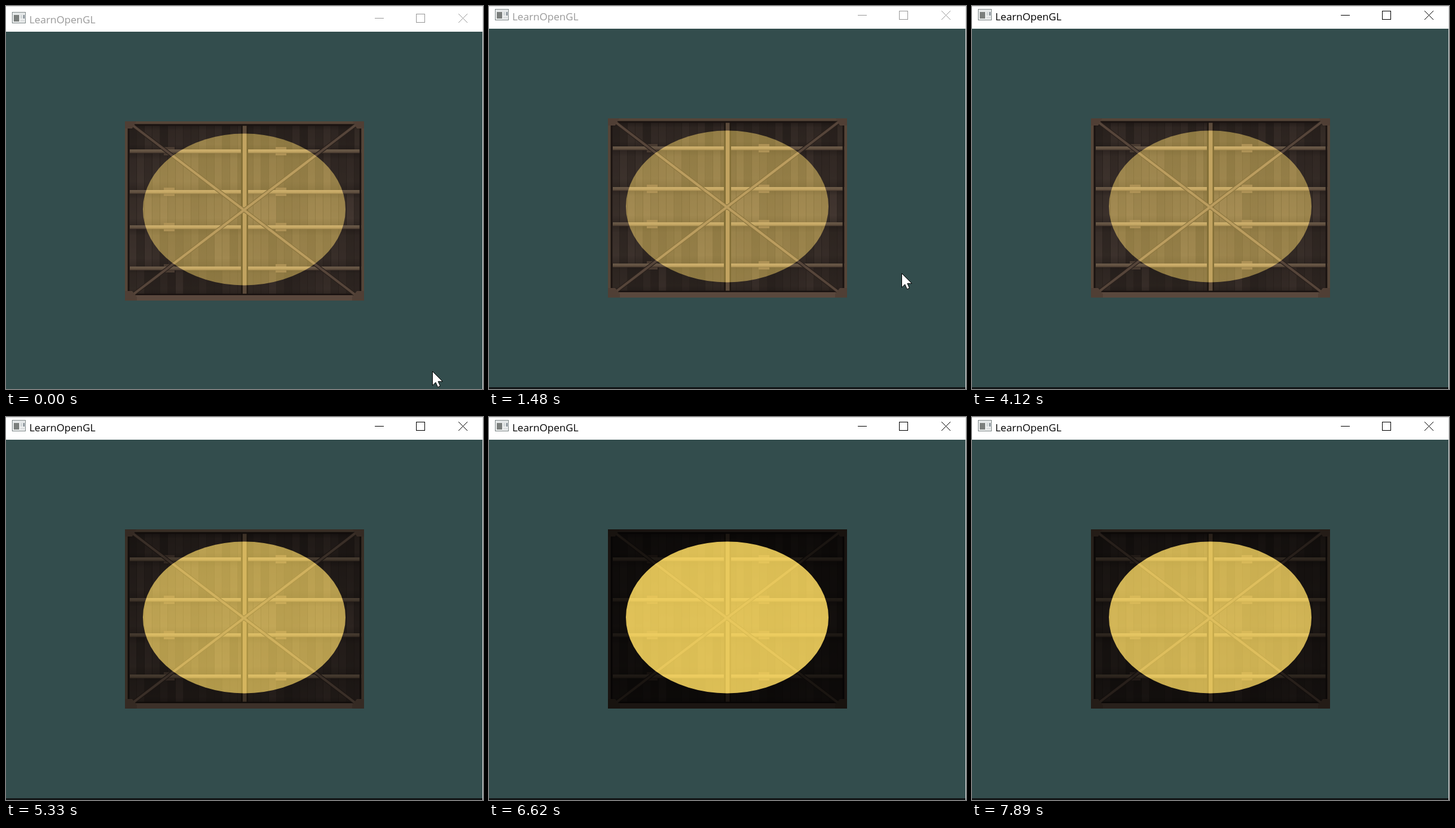
An HTML page that plays this animation: 798 by 641 pixels, repeating every 8000 ms.

```html
<!DOCTYPE html>
<html lang="en">
<head>
<meta charset="utf-8">
<title>LearnOpenGL</title>
<style>
html, body { margin: 0; width: 100%; height: 100%; overflow: hidden; background: #334d4d; }
svg { display: block; width: 798px; height: 641px; }
text { font: 17.1px "Open Sans", "Noto Sans", sans-serif; }
</style>
</head>
<body>
<svg viewBox="0 0 798 641">
  <defs>
    <linearGradient id="shade" x2="0" y2="1">
      <stop offset="0" stop-color="#17100f" stop-opacity=".45"/>
      <stop offset=".25" stop-color="#17100f" stop-opacity=".08"/>
      <stop offset=".8" stop-color="#17100f" stop-opacity="0"/>
      <stop offset="1" stop-color="#17100f" stop-opacity=".2"/>
    </linearGradient>
    <linearGradient id="beam" x2="0" y2="1">
      <stop offset="0" stop-color="#b3977c"/>
      <stop offset=".65" stop-color="#a08469"/>
      <stop offset="1" stop-color="#655044"/>
    </linearGradient>
    <clipPath id="quad"><rect width="400" height="300"/></clipPath>
  </defs>
  <rect width="798" height="641" fill="#334d4d"/>
  <g id="win">
    <rect width="798" height="43" fill="#fff"/>
    <rect id="hover" width="69" height="43" fill="#e5e5e5"/>
    <g shape-rendering="crispEdges">
      <rect x="10.5" y="10.5" width="22" height="18" fill="#eef0f0" stroke="#7e8788"/>
      <rect x="12" y="12" width="19" height="2" fill="#dfe3e4"/>
      <rect x="13" y="15" width="9" height="11" fill="#7b7f7d"/>
      <rect x="24" y="15" width="4" height="6" fill="#d5dadb"/>
      <rect x="29" y="15" width="2" height="6" fill="#75808a"/>
      <rect x="24" y="23" width="7" height="3" fill="#dcdfe0"/>
    </g>
    <text id="title" x="39" y="29">LearnOpenGL</text>
    <g id="buttons" fill="none">
      <path d="M617 20.5h15M686.5 13.5h14v14h-14z" shape-rendering="crispEdges"/>
      <path d="M757 13l15 15M772 13l-15 15"/>
    </g>
    <g transform="translate(199 193)" clip-path="url(#quad)">
      <g id="wood"></g>
      <g id="mix">
        <rect width="400" height="300" fill="#000"/>
        <ellipse cx="199.5" cy="147.5" rx="169.5" ry="127" fill="#fbda5c"/>
      </g>
    </g>
    <rect y="643" width="798" height="9" fill="#121617"/>
  </g>
  <rect width="798" height="1" fill="#d2d2d2"/>
  <rect x="797" width="1" height="641" fill="#dcdfdf"/>
  <path id="cursor" d="M.5 .5v23.5l5.3-5.1 3.6 8 4-1.8-3.5-7.8h7.4z" fill="#fff" stroke="#000"/>
</svg>
<script>
const LOOP = 8000;
const STEP = 67;
const $ = id => document.getElementById(id);

function add(tag, attrs) {
  const el = document.createElementNS("http://www.w3.org/2000/svg", tag);
  for (const key in attrs) el.setAttribute(key, attrs[key]);
  $("wood").appendChild(el);
}
const box = (x, y, width, height, fill) => add("rect", { x, y, width, height, fill });

function buildPlanks(top, height, tone, rand) {
  for (let x = 7; x < 395; x += 13) {
    const v = tone + (rand() - 0.5) * 26;
    box(x, top, 12.3, height, `rgb(${v}, ${v * 0.82}, ${v * 0.73})`);
  }
  box(7, top, 388, height, "url(#shade)");
}

function buildWood() {
  let seed = 17;
  const rand = () => (seed = (seed * 16807) % 2147483647) / 2147483647;
  const edges = [5, 47, 115, 174, 243, 290];

  box(0, 0, 400, 300, "#43352f");
  for (let i = 0; i < 5; i++) {
    buildPlanks(edges[i], edges[i + 1] - edges[i], 98 - 9 * Math.abs(i - 2), rand);
  }
  for (const y of edges.slice(1, 5)) {
    for (const x of [65, 252]) box(x, y - 4, 18, 14, "#7b6353");
    box(8, y, 388, 6.5, "url(#beam)");
  }

  // Centre post, then the outer frame with its inner shadow.
  box(194, 5, 12, 286, "#33271f");
  box(197, 5, 6.5, 286, "#9c7e63");
  add("rect", { x: 6, y: 6, width: 388, height: 284, fill: "none", stroke: "#2c211d", "stroke-width": 3 });
  add("rect", { x: 2, y: 2, width: 396, height: 292, fill: "none", stroke: "#8f745f", "stroke-width": 5 });
  box(0, 291, 400, 9, "#987a67");

  const bars = "M12 6L386 291M386 6L12 291";
  add("path", { d: bars, stroke: "#46372f", "stroke-width": 6.5 });
  add("path", { d: bars, stroke: "#917562", "stroke-width": 4 });
  for (const side of ["", "translate(400 0) scale(-1 1)"]) {
    add("path", { d: "M0 0h19l-7 12h-12zM0 300v-16h12l8 10v6z", fill: "#866b59", transform: side });
  }
}

// Progress from 0 to 1, advancing once per redraw.
function ramp(t, from, to) {
  const n = Math.max(1, Math.round((to - from) / STEP));
  const p = Math.floor(n * (t - from) / (to - from)) / n;
  return Math.min(1, Math.max(0, p));
}
const lerp = (a, b, p) => a + (b - a) * p;

// Held keys: start, end, first and last blend.
const keys = [
  [5330, 5660, 0.6, 1],
  [6620, 6820, 0.82, 0],
  [7750, 7890, 0.25, 0.73]
];
function blend(t) {
  let value = 0.4;
  for (const [from, to, a, b] of keys) {
    if (t >= from) value = lerp(a, b, ramp(t, from, to));
  }
  return value;
}

// Pointer moves: start, end, destination.
const moves = [
  [0, 70, 711, 607],
  [360, 470, 690, 447],
  [1740, 1870, 693, 16],
  [2020, 2160, 630, 16],
  [2160, 2360, 662, 650]
];
function pointer(t) {
  let x = 713, y = 611;
  for (const [from, to, toX, toY] of moves) {
    const p = ramp(t, from, to);
    x = lerp(x, toX, p);
    y = lerp(y, toY, p);
  }
  return { x, y };
}

function draw(t) {
  const dy = t < 1030 ? 0 : -Math.round(lerp(1, 5, ramp(t, 1030, 1480)));
  const { x, y } = pointer(t);
  const ink = t < 3930 ? "#999" : "#000";
  const overButton = y < 38 && x > 589;
  $("win").setAttribute("transform", `translate(0 ${dy})`);
  $("mix").setAttribute("opacity", blend(t));
  $("cursor").setAttribute("transform", `translate(${x} ${y})`);
  $("hover").setAttribute("x", overButton ? 589 + 70 * Math.floor((x - 589) / 70) : -99);
  $("title").setAttribute("fill", ink);
  $("buttons").setAttribute("stroke", ink);
}

buildWood();
const start = performance.now();
function tick() {
  draw((performance.now() - start) % LOOP);
  requestAnimationFrame(tick);
}
tick();
</script>
</body>
</html>
```
